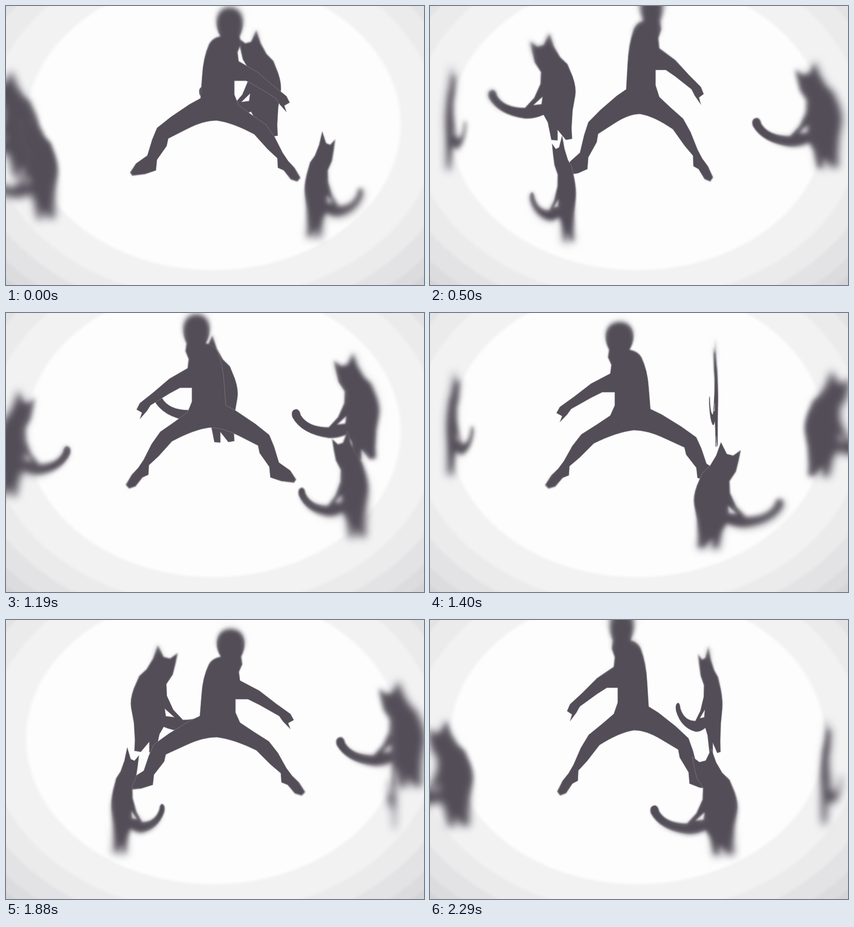
Recreate the animation shown at these times as an HTML page with a canvas. Size 784 by 523 pixels, loop 2.39 s.

```html
<!DOCTYPE html>
<html lang="en">
<head>
<meta charset="utf-8">
<title>Dancer and cats</title>
<style>
  html, body { margin: 0; width: 100%; height: 100%; overflow: hidden; background: #fdfdfd; }
  canvas { display: block; }
</style>
</head>
<body>
<canvas id="stage" width="784" height="523"></canvas>
<script>
const W = 784, H = 523, PAD = 40, LOOP = 2390, LAST = 76;
const INK = '#524d57', RIM = 'rgba(150,145,155,.55)', RAD = Math.PI / 180;

const man = new Path2D(`M438 55 C450 30 445 0 419 0 C395 0 388 30 402 55
  Q387 58 381 70 Q370 95 368 130 L365 172 L345 183 L310 207 L284 228 L275 250 L266 280 L245 295
  L234 312 L238 318 L262 315 L282 308 L284 288 L302 262 L305 248 L340 230 Q370 214 395 214
  Q425 218 465 240 L490 268 L508 285 L509 303 L520 308 L533 325 L545 329 L551 322 L540 303
  L528 290 L518 275 L503 245 L487 222 L460 203 L436 185 L428 165 L428 139 L450 139 L470 150
  L505 172 L512 183 L525 198 L521 186 L531 180 L525 168 L500 148 L470 122 L436 102 L434 85 L440 70Z`);

// Faces left; the body is centred on the origin.
const cat = new Path2D(`M-50 -88 L-36 -78 L-24 -81 L-13 -103 L-4 -78 L8 -58 L22 -45 L32 -22
  Q40 0 37 15 L32 42 L30 75 L31 95 L19 97 L3 78 L3 98 L-9 97 L-16 64 L-24 50 Q-42 58 -60 57
  Q-112 50 -130 18 Q-134 4 -122 3 Q-116 4 -114 14 Q-100 37 -60 37 L-42 18 L-30 -8 L-29 -30
  L-41 -48 L-46 -68Z M-44 32 L-28 30 L-26 16Z`);

// Four cats in a ring of eight places, each with its own starting turn in degrees.
const cats = [
  { place: 1, turn: 118 },
  { place: 3, turn: 310 },
  { place: 4, turn: 18 },
  { place: 6, turn: 42 },
];

function layer(width, height) {
  const c = document.createElement('canvas');
  c.width = width;
  c.height = height;
  return c.getContext('2d');
}
const stage = document.getElementById('stage').getContext('2d');
const ink = layer(W + 2 * PAD, H + 2 * PAD);
const soft = layer(W, H), mix = layer(W, H), backdrop = layer(W, H);

// Fills the layer with an elliptical gradient; stops are [distance, colour].
function radial(ctx, cx, cy, rx, ry, stops) {
  const g = ctx.createRadialGradient(0, 0, 0, 0, 0, 2);
  for (const [d, colour] of stops) g.addColorStop(d / 2, colour);
  ctx.save();
  ctx.translate(cx, cy);
  ctx.scale(rx, ry);
  ctx.fillStyle = g;
  ctx.fillRect(-3, -3, 6, 6);
  ctx.restore();
}

const bands = [[1, '#f2f2f3'], [1.2, '#ebebec'], [1.33, '#e3e3e5'], [1.45, '#dcdcdf'], [1.53, '#d5d5d8']];
let tone = '#fdfdfd';
radial(backdrop, 389, 222, 351, 273, [[0, tone], ...bands.flatMap(([d, next]) => {
  const edge = [[d - .012, tone], [d + .012, next]];
  tone = next;
  return edge;
})]);

// Each blur has a ring-shaped mask that fades into its neighbours.
const blurs = [0, 1.6, 4.5, 8];
const reach = i => .45 + .18 * i;
const masks = blurs.map((_, i) => [
  i ? [reach(i - 1), '#0000'] : [0, '#000'],
  [reach(i), '#000'],
  ...(i < blurs.length - 1 ? [[reach(i + 1), '#0000']] : []),
]);

function silhouette(shape, ...matrix) {
  const placed = new Path2D();
  placed.addPath(shape, new DOMMatrix(matrix));
  ink.fill(placed, 'evenodd');
  ink.stroke(placed);
}

// Sinks with growing speed, snaps up again, and turns round on every second beat.
function drawMan(n) {
  const beat = (n + 7) % 8;
  const sink = beat < 7 ? (beat / 6) ** 2 : Math.SQRT1_2;
  const k = 3 * sink - 2, sx = 1 + .062 * k, sy = 1 - .05 * k;
  const flip = Math.floor((n + 15) / 16) % 2 ? -1 : 1;
  silhouette(man, sx * flip, 0, 0, sy, 388.5 * (1 - sx * flip), 330 * (1 - sy));
}

function orbit({ place, turn }, n) {
  const angle = (14 + 45 * place + 3.06 * n) * RAD;
  const c = Math.cos((turn + 18.3 * n) * RAD);
  return {
    x: 390 + 378 * Math.cos(angle),
    y: 249 + 104 * Math.sin(angle),
    w: c * (1.5 - c * c / 2),
    front: Math.sin(angle) > 0,
  };
}

function drawCat({ x, y, w }) {
  silhouette(cat, Math.abs(w) < .1 ? .1 : w, 0, 0, 1, x, y);
}

function draw(n) {
  ink.setTransform(1, 0, 0, 1, 0, 0);
  ink.clearRect(0, 0, W + 2 * PAD, H + 2 * PAD);
  ink.translate(PAD, PAD);
  ink.fillStyle = INK;
  ink.strokeStyle = RIM;

  const ring = cats.map(c => orbit(c, n)).sort((a, b) => a.y - b.y);
  ring.filter(c => !c.front).forEach(drawCat);
  drawMan(n);
  ring.filter(c => c.front).forEach(drawCat);

  // The lens gets softer away from the middle.
  mix.globalCompositeOperation = 'lighter';
  mix.clearRect(0, 0, W, H);
  blurs.forEach((radius, i) => {
    soft.globalCompositeOperation = 'source-over';
    soft.clearRect(0, 0, W, H);
    soft.filter = radius ? `blur(${radius}px)` : 'none';
    soft.drawImage(ink.canvas, -PAD, -PAD);
    soft.filter = 'none';
    soft.globalCompositeOperation = 'destination-in';
    radial(soft, 388, 220, 390, 250, masks[i]);
    mix.drawImage(soft.canvas, 0, 0);
  });
  stage.drawImage(backdrop.canvas, 0, 0);
  stage.drawImage(mix.canvas, 0, 0);
}

let shown = -1;
function tick() {
  const t = performance.now() % LOOP;
  const n = Math.min(LAST, Math.floor((t + 15) / 29.85));
  if (n !== shown) draw(shown = n);
  requestAnimationFrame(tick);
}
tick();
</script>
</body>
</html>
```
